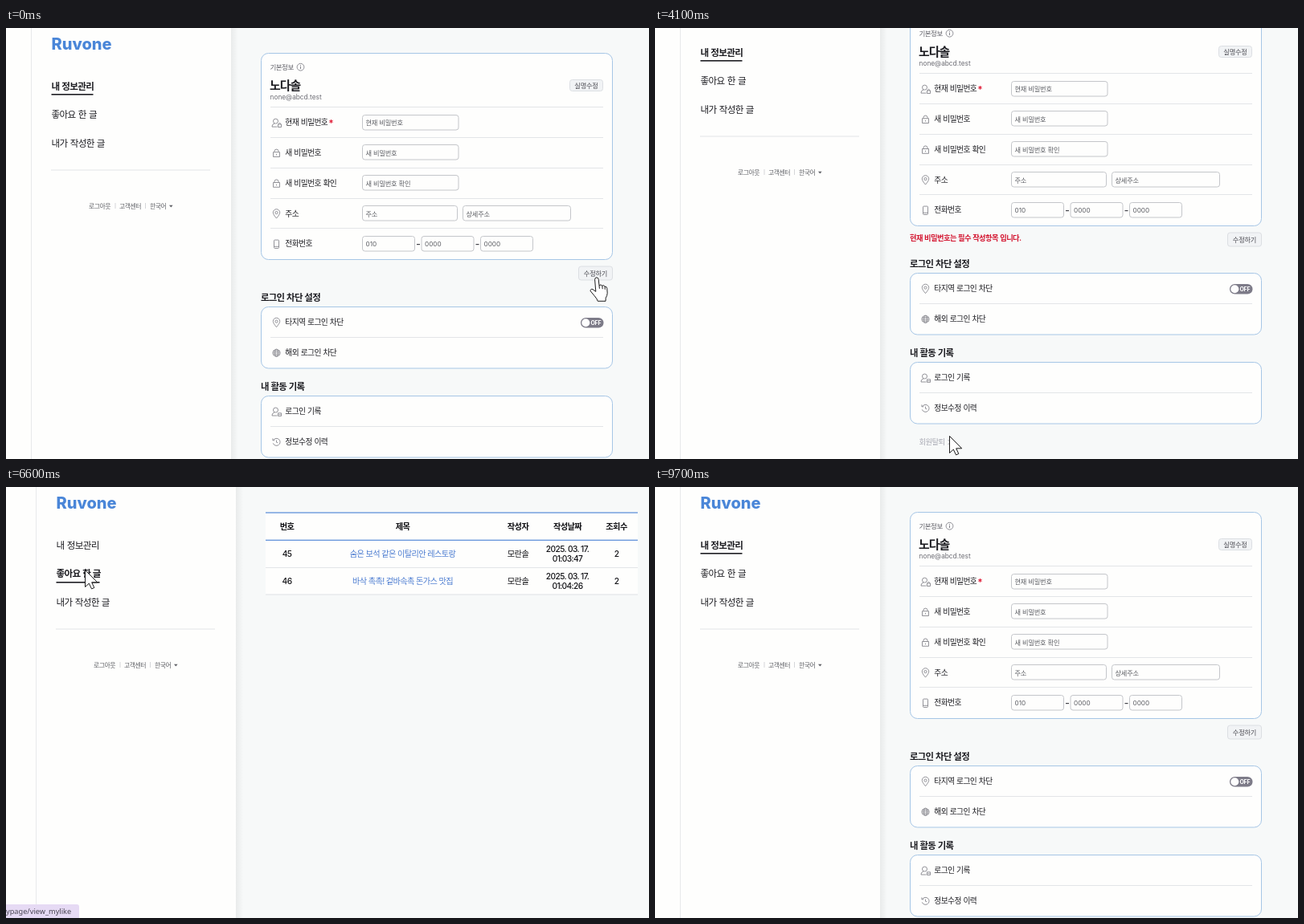
These frames come from a looping animation (800 px wide and 537 px high, 9.8 s). An HTML page with a canvas:

```html
<!DOCTYPE html>
<html lang="ko">
<head>
<meta charset="utf-8">
<title>내 정보관리</title>
<style>
html, body { margin: 0; width: 100%; height: 100%; overflow: hidden; background: #f7f9f9; }
canvas { display: block; width: 800px; height: 537px; }
</style>
</head>
<body>
<canvas id="stage" width="800" height="537"></canvas>
<script>
const ctx = document.getElementById('stage').getContext('2d');
const W = 800, H = 537, LOOP = 9800, STEP = 100;
const FONT = 'Inter, "Noto Sans CJK KR", "Noto Sans CJK", sans-serif';
const DIALOG_FONT = '"Noto Sans", "Noto Sans CJK KR", "Noto Sans CJK", sans-serif';
const PAGE = '#f7f9f9', PANEL = '#fefefd';
const INK = '#1d1d22', GRAY = '#6c6c74', RULE = '#e3e5e8', BLUE = '#4a86d8';
const BRAND = 'Ruvone', USER = '노다솔', MAIL = 'none@abcd.test', AUTHOR = '모란솔';

// Scenes, in ms
const ERROR_AT = 500, SCROLL = [1300, 1600], SCROLL_MAX = 42, ARROW_AT = 2200;
const DIALOG = [4500, 5300], LIKES_AT = 6300, POSTS_AT = 8200, RESET_AT = 9500;
const STATUS = [
  [4200, 5300, 'ypage#', 38],
  [6000, 7700, 'ypage/view_mylike', 91],
  [7700, RESET_AT, 'ypage/view_mypost', 91]
];
const POINTER = [
  [0, 734.6, 310.8], [ARROW_AT, 734.6, 310.8], [3400, 366.5, 508.5], [4500, 366.5, 508.5],
  [5000, 561, 75.5], [5200, 561, 75.5], [5800, 109.5, 99.5], [6100, 98.5, 103.5],
  [7200, 98.5, 103.5], [7900, 101.5, 146], [LOOP, 101.5, 146]
];

const ARROW = new Path2D('M0 0V21L4.8 16.6L8 23.4L11.3 22L8.2 15.3H15.2Z');
const HAND = new Path2D('M-2 2.6Q-1.8 0 .4 0Q2.4 .2 2.6 2.6L3.4 10Q5.4 8 7.2 10.4' +
  'Q9.2 8.8 10.4 11.4Q12.6 10.6 13.2 13.6L13.6 19.5Q13.4 23 11.6 25.5L11.4 29.5H1.6' +
  'Q.8 26.5 -2.4 23L-7.4 17Q-7.6 13.8 -4.6 14.8L-.8 17.6Z');
const HAND_LINES = new Path2D('M3.4 10L3.8 14M7.2 10.4L7.6 14.4M10.4 11.4L10.7 15');

const ICONS = {
  user: new Path2D('M-4 -2a3 3 0 1 0 6 0a3 3 0 1 0 -6 0M-2.5 1Q-6 2 -5.5 5H1'),
  badge: new Path2D('M2 1.8H6V5.4H2ZM3 1.8V.8Q4 -.6 5 .8V1.8'),
  plus: new Path2D('M2 1.8H6V5.4H2ZM3 3.6H5'),
  lock: new Path2D('M-4 -1.2H4V4.6H-4ZM-2.5 -1.2V-2.5Q-2.4 -4.8 0 -4.8Q2.4 -4.8 2.5 -2.5V-1.2M0 1V2.6'),
  pin: new Path2D('M0 5.6Q-4.2 .8 -4.2 -1.6A4.2 4.2 0 0 1 4.2 -1.6Q4.2 .8 0 5.6ZM-1.6 -1.4a1.6 1.6 0 1 0 3.2 0a1.6 1.6 0 1 0 -3.2 0'),
  phone: new Path2D('M-2 -5.2H2Q3 -5.2 3 -4.2V4.2Q3 5.2 2 5.2H-2Q-3 5.2 -3 4.2V-4.2Q-3 -5.2 -2 -5.2M-3 3H3'),
  globe: new Path2D('M-4.5 0a4.5 4.5 0 1 0 9 0a4.5 4.5 0 1 0 -9 0M-2 0a2 4.5 0 1 0 4 0a2 4.5 0 1 0 -4 0M-4.5 0H4.5M-4 -2.2H4M-4 2.2H4'),
  history: new Path2D('M-3.8 -2.3A4.5 4.5 0 1 1 -4.2 1.6M-4.6 -4.4V-2H-2.2M0 -2.2V.4L1.8 1')
};

// y is the optical centre of the line; spacing and gap (between words) are in em
function text(str, x, y, size, opt = {}) {
  const { color = INK, weight = 400, align = 'left', spacing = -0.06, gap = 0.06, font = FONT } = opt;
  ctx.font = `${weight} ${size}px ${font}`;
  ctx.letterSpacing = `${spacing * size}px`;
  ctx.wordSpacing = `${gap * size}px`;
  ctx.textAlign = align;
  ctx.fillStyle = color;
  ctx.fillText(str, x, y + size * 0.37);
}

function box(x, y, w, h, r, fill, stroke, width = 1) {
  ctx.beginPath();
  ctx.roundRect(x, y, w, h, r);
  if (fill) { ctx.fillStyle = fill; ctx.fill(); }
  if (stroke) { ctx.strokeStyle = stroke; ctx.lineWidth = width; ctx.stroke(); }
}

function rect(x, y, w, h, color) {
  ctx.fillStyle = color;
  ctx.fillRect(x, y, w, h);
}

function dot(x, y, r, fill, stroke) {
  box(x - r, y - r, 2 * r, 2 * r, r, fill, stroke, 0.9);
}

function icon(names, y) {
  ctx.save();
  ctx.translate(336.5, y);
  ctx.strokeStyle = '#808087';
  ctx.lineWidth = 0.85;
  names.split(' ').forEach(name => ctx.stroke(ICONS[name]));
  ctx.restore();
}

function row(names, label, y) {
  icon(names, y + 0.5);
  text(label, 347.3, y, 9.75, { weight: 500 });
}

function field(x, w, y, hint) {
  box(x + 0.5, Math.round(y - 9) - 0.5, w - 1, 18.5, 3, PANEL, '#c4c6ca');
  const spacing = /\d/.test(hint) ? 0 : -0.02;
  text(hint, x + 4.5, y + 0.5, 8.2, { color: '#5b5d63', spacing, gap: 0 });
}

function button(x, y, w, h, label) {
  box(x + 0.5, y + 0.5, w - 1, h - 1, 3, '#f1f3f5', '#dcdfe3');
  text(label, x + w / 2, y + h / 2, 8.2, { color: '#4c4c53', align: 'center', spacing: -0.02 });
}

function card(y, h) {
  box(317.5, y, 437, h, 9, PANEL, '#a6c6e6');
}

function sidebar(active, dx) {
  ctx.save();
  ctx.translate(dx, 0);
  const edge = ctx.createLinearGradient(280, 0, 289, 0);
  edge.addColorStop(0, '#e9ebeb');
  edge.addColorStop(1, PAGE);
  rect(280, 0, 9, H + SCROLL_MAX, edge);
  rect(-dx, 0, 280 + dx, H + SCROLL_MAX, PANEL);
  rect(31, 0, 1, H + SCROLL_MAX, '#e8e9eb');
  text(BRAND, 56.5, 19.8, 20, { color: BLUE, weight: 800, spacing: 0 });
  ['내 정보관리', '좋아요 한 글', '내가 작성한 글'].forEach((label, i) => {
    const y = 72.7 + i * 35.3;
    const on = i === active;
    text(label, 56.5, y, 11.6, { weight: on ? 700 : 400 });
    if (on) rect(56.5, Math.round(y + 9.5), [52, 54, 64][i], 1.6, INK);
  });
  rect(56, 176.5, 198, 1, RULE);
  const small = { color: '#5f6066' };
  text('로그아웃', 103, 221.7, 7.9, small);
  text('고객센터', 141, 221.7, 7.9, small);
  text('한국어', 179, 221.7, 7.9, small);
  rect(135.5, 218, 1, 7, '#d5d6d9');
  rect(173, 218, 1, 7, '#d5d6d9');
  ctx.fillStyle = '#5f6066';
  ctx.fill(new Path2D('M203 220.8H207.6L205.3 223.4Z'));
  ctx.restore();
}

function profile(showError) {
  card(31.5, 257);
  text('기본정보', 328.5, 48.5, 8.5, { color: '#5f5f67', weight: 500 });
  dot(366.5, 48.7, 4.4, null, '#85858c');
  rect(366.1, 47.8, 0.9, 3.2, '#75757c');
  rect(366.1, 46.1, 0.9, 1, '#75757c');
  text(USER, 328, 71.5, 14.9, { weight: 700 });
  text(MAIL, 328.5, 86, 8.3, { color: GRAY, spacing: 0 });
  button(701, 64, 42, 15, '실명수정');

  const rows = [
    ['user badge', '현재 비밀번호'], ['lock', '새 비밀번호'], ['lock', '새 비밀번호 확인'],
    ['pin', '주소'], ['phone', '전화번호']
  ];
  rows.forEach(([names, label], i) => {
    const y = 117.6 + i * 37.8;
    rect(329, Math.round(y - 19.4), 414, 1, RULE);
    row(names, label, y);
    if (i < 3) field(443, 120.5, y, label);
  });
  text('*', 401.3, 119, 11.5, { color: '#e0203a', weight: 700, spacing: 0 });
  field(443, 119, 231, '주소');
  field(568, 135, 231, '상세주소');
  field(443, 66, 268.8, '010');
  field(516.5, 66, 268.8, '0000');
  field(590, 66, 268.8, '0000');
  rect(511, 269, 4, 1.2, '#44444a');
  rect(584.5, 269, 4, 1.2, '#44444a');

  if (showError) {
    text('현재 비밀번호는 필수 작성항목 입니다.', 317, 303.7, 9.25, { color: '#d3142f', weight: 700 });
  }
  button(712, 296.5, 43, 18, '수정하기');

  text('로그인 차단 설정', 317, 335.7, 11.4, { weight: 700 });
  card(347.5, 76.5);
  row('pin', '타지역 로그인 차단', 366.5);
  rect(329, 385, 414, 1, RULE);
  row('globe', '해외 로그인 차단', 404.3);
  box(715, 361, 28.5, 12.5, 6.25, '#7d7b88');
  dot(721.3, 367.3, 5, '#fefefe');
  text('OFF', 727.5, 367.3, 7, { color: '#fff', weight: 700, spacing: -0.04 });

  text('내 활동 기록', 317, 446.7, 11.4, { weight: 700 });
  card(458.5, 76.5);
  row('user plus', '로그인 기록', 477.5);
  rect(329, 496, 414, 1, RULE);
  row('history', '정보수정 이력', 515.3);

  text('회원탈퇴', 328.5, 557.7, 9.3, { color: '#a9aab4' });
  ctx.strokeStyle = '#a9aab4';
  ctx.lineWidth = 1;
  ctx.stroke(new Path2D('M364.5 555L367.5 558L364.5 561'));
}

function posts() {
  const columns = [349.5, 493.5, 637, 698.5, 759.5];
  const cell = (str, col, y, opt) =>
    text(str, columns[col], y, 10.2, { color: '#101014', weight: 500, align: 'center', gap: 0, ...opt });
  rect(323, 31, 463, 103, PANEL);
  rect(323, 31.3, 463, 1.4, '#6c99dc');
  rect(323, 65.6, 463, 1.4, '#6c99dc');
  rect(323, 100, 463, 1, RULE);
  rect(323, 133.5, 463, 1, '#dfe2e6');
  ['번호', '제목', '작성자', '작성날짜', '조회수'].forEach((str, i) => cell(str, i, 49.3, { weight: 700 }));
  const list = [
    ['45', '숨은 보석 같은 이탈리안 레스토랑', '01:03:47'],
    ['46', '바삭 촉촉! 겉바속촉 돈가스 맛집', '01:04:26']
  ];
  list.forEach(([id, title, time], i) => {
    const y = 83.5 + i * 33.7;
    cell(id, 0, y);
    cell(title, 1, y, { color: '#4a7bd0', weight: 400 });
    cell(AUTHOR, 2, y, { weight: 400 });
    cell('2025. 03. 17.', 3, y - 6);
    cell(time, 3, y + 6);
    cell('2', 4, y);
  });
}

function dialog() {
  ctx.save();
  ctx.shadowColor = 'rgba(40,30,60,.45)';
  ctx.shadowBlur = 6;
  ctx.shadowOffsetY = 1;
  box(237.5, -20, 353.5, 117.5, 8, '#fbf9fd');
  ctx.restore();
  const style = { font: DIALOG_FONT, spacing: 0.04, gap: 0, color: '#1f1d24' };
  text('탈퇴한 회원의 정보는 복구할 수 없습니다.', 254, 16, 10.8, style);
  text('회원탈퇴 하시겠습니까?', 254, 32, 10.8, style);
  box(466, 50, 55, 33.5, 16.7, '#fff', '#5c4586', 2);
  box(468.5, 52.5, 50, 28.5, 14.2, '#5c4586');
  box(525, 52, 50, 29.5, 14.7, '#dacbee');
  text('확인', 493.3, 67, 10.6, { ...style, align: 'center', color: '#fff' });
  text('취소', 550, 67, 10.6, { ...style, align: 'center', color: '#2b1c49' });
}

function statusBar(label, width) {
  box(-4, 520, width + 4, 22, 3, '#e6daf4');
  text(label, 0, 529, 9.2, { font: DIALOG_FONT, spacing: 0, color: '#4a4553' });
}

const ease = p => p * p * (3 - 2 * p);
const progress = (t, a, b) => ease(Math.min(1, Math.max(0, (t - a) / (b - a))));

function pointer(t) {
  const i = POINTER.findIndex(([at]) => at > t);
  const [t0, x0, y0] = POINTER[i - 1];
  const [t1, x1, y1] = POINTER[i];
  const p = progress(t, t0, t1);
  ctx.save();
  ctx.translate(x0 + (x1 - x0) * p, y0 + (y1 - y0) * p);
  ctx.fillStyle = '#fff';
  ctx.strokeStyle = '#111';
  ctx.lineWidth = 0.95;
  const shape = t < ARROW_AT ? HAND : ARROW;
  ctx.fill(shape);
  ctx.stroke(shape);
  if (shape === HAND) ctx.stroke(HAND_LINES);
  ctx.restore();
}

function draw(t) {
  rect(0, 0, W, H, PAGE);
  const within = (a, b) => t >= a && t < b;
  if (within(LIKES_AT, RESET_AT)) {
    sidebar(t < POSTS_AT ? 1 : 2, 6);
    posts();
  } else {
    const scroll = t < DIALOG[1] ? SCROLL_MAX * progress(t, ...SCROLL) : 0;
    ctx.save();
    ctx.translate(0, -Math.round(scroll));
    sidebar(0, 0);
    profile(within(ERROR_AT, RESET_AT));
    ctx.restore();
  }
  if (within(...DIALOG)) dialog();
  const status = STATUS.find(([a, b]) => within(a, b));
  if (status) statusBar(status[2], status[3]);
  if (t < RESET_AT) pointer(t);
}

const start = performance.now();
function tick() {
  const t = (performance.now() - start) % LOOP;
  draw(Math.floor(t / STEP) * STEP);
  requestAnimationFrame(tick);
}
tick();
</script>
</body>
</html>
```
